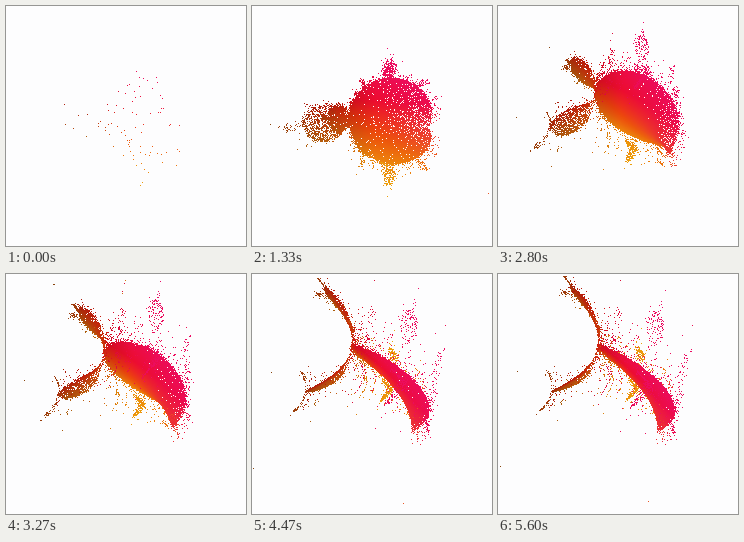
Animation of 240 by 240 pixels, one loop 5670 ms. Source, as an HTML page with a canvas:

```html
<!DOCTYPE html>
<html lang="en">
<head>
<meta charset="utf-8">
<title>Mandelbrot set turning into its bifurcation diagram</title>
<style>
  html, body { margin: 0; width: 100%; height: 100%; overflow: hidden; background: #fdfdfe; }
  canvas { display: block; width: 100vw; height: 100vh; image-rendering: pixelated; }
</style>
</head>
<body>
<canvas id="stage" width="240" height="240"></canvas>
<script>
const SIZE = 240, LOOP = 5670, STEPS = 85;
const TURN_TIME = 5400, FILL_TIME = 1600;
const TURN = Math.PI / 2, ROLL = .183;
const CENTRE = { x: 121, y: 117 };
const PIVOT = { x: -.35, z: .03 };
const FOCUS = 207, DISTANCE = 2.8;

const ctx = document.getElementById('stage').getContext('2d');
const image = ctx.createImageData(SIZE, SIZE);
const pixels = new Uint32Array(image.data.buffer);
const depths = new Float32Array(SIZE * SIZE);
const rgb = (r, g, b) => (255 << 24 | b << 16 | g << 8 | r) >>> 0;
const BACK = rgb(253, 253, 254);

let seed = 20417;
function random() {
  seed = (seed + 0x6D2B79F5) | 0;
  let t = Math.imul(seed ^ seed >>> 15, 1 | seed);
  t ^= t + Math.imul(t ^ t >>> 7, 61 | t);
  return ((t ^ t >>> 14) >>> 0) / 4294967296;
}

const clamp = (v, lo, hi) => Math.max(lo, Math.min(hi, v));
const easeInOut = t => t < .5 ? 4 * t ** 3 : 1 - 4 * (1 - t) ** 3;

// Real part of a late iterate of z² + c, or null when it escapes.
function settle(cr, ci, count) {
  let x = 0, y = 0;
  for (let i = 0; i < count; i++) {
    const xx = x * x, yy = y * y;
    if (xx + yy > 4) return null;
    y = 2 * x * y + ci;
    x = xx - yy + cr;
  }
  return x;
}

function colour(cr, ci) {
  const t = ci / .65;
  return rgb(
    clamp(262 + 78 * cr, 135, 236),
    clamp(50 - 85 * t - 10 * cr, 12, 160),
    clamp(40 + 50 * t + 50 * cr, 12, 120));
}

function makePoints() {
  const points = [], step = .01;
  for (let row = -112; row <= 112; row++) {
    for (let col = -200; col <= 48; col++) {
      const cr = (col + .5 * random()) * step;
      const ci = (row + .5 * random()) * step;
      const z = settle(cr, ci, 120 + Math.floor(random() * 12));
      const rank = random();
      if (z === null) continue;
      points.push({ x: cr - PIVOT.x, y: ci, z: z - PIVOT.z, rank, ink: colour(cr, ci) });
    }
  }
  return points;
}

const points = makePoints();
let last = -1;

// Tip the c-plane towards the viewer, roll the view, then project in perspective.
function draw(step) {
  const time = step * LOOP / STEPS;
  const turned = easeInOut(Math.min(1, time / TURN_TIME));
  const shown = Math.min(1, .006 + time / FILL_TIME);
  const cos = Math.cos(TURN * turned), sin = Math.sin(TURN * turned);
  const roll = ROLL * turned * turned;
  const rollCos = Math.cos(roll), rollSin = Math.sin(roll);
  pixels.fill(BACK);
  depths.fill(-Infinity);
  for (const p of points) {
    if (p.rank > shown) continue;
    const down = p.z * sin - p.y * cos;
    const near = p.z * cos + p.y * sin;
    const scale = FOCUS / (DISTANCE - near);
    const x = Math.round(CENTRE.x + scale * (p.x * rollCos - down * rollSin));
    const y = Math.round(CENTRE.y + scale * (p.x * rollSin + down * rollCos));
    if (x < 0 || x >= SIZE || y < 0 || y >= SIZE) continue;
    const i = y * SIZE + x;
    if (near < depths[i]) continue;
    depths[i] = near;
    pixels[i] = p.ink;
  }
  ctx.putImageData(image, 0, 0);
}

function tick() {
  const time = performance.now() % LOOP;
  const step = Math.min(STEPS - 1, Math.floor((time + 4) * STEPS / LOOP));
  if (step !== last) draw(last = step);
  requestAnimationFrame(tick);
}
tick();
</script>
</body>
</html>
```
